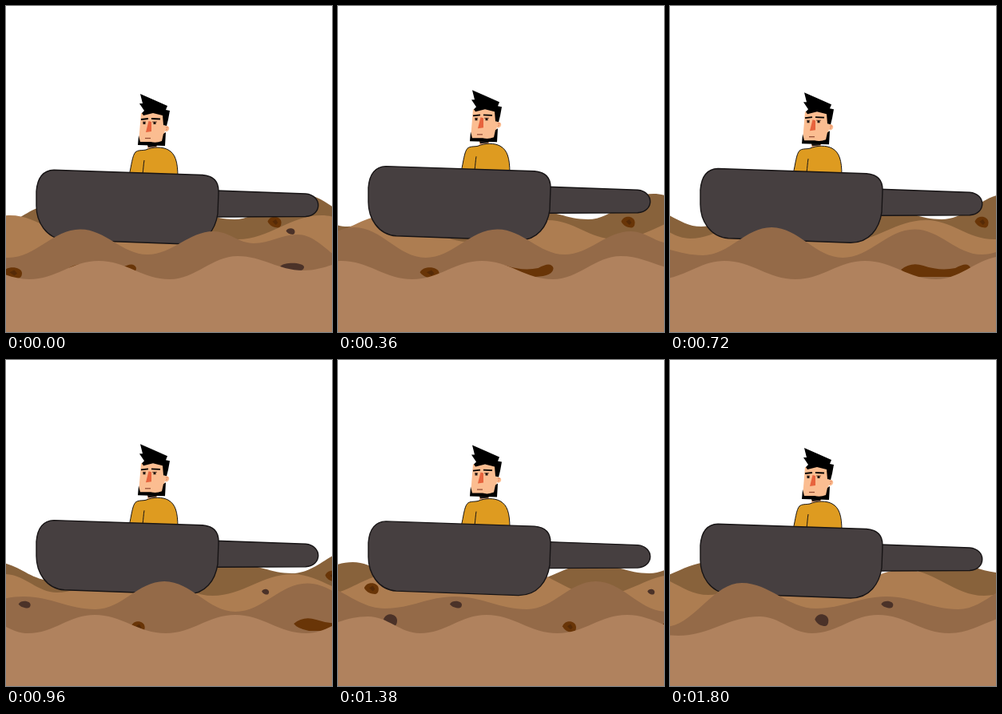
Write an HTML page with a canvas that moves like this. It is 408 px wide and 408 px high and loops after 1860 ms.

```html
<!DOCTYPE html>
<html lang="en">
<head>
<meta charset="utf-8">
<title>Pan on the dunes</title>
<style>
html, body { margin: 0; width: 100%; height: 100%; overflow: hidden; background: #fff; }
canvas { display: block; width: 408px; height: 408px; }
</style>
</head>
<body>
<canvas id="stage" width="408" height="408"></canvas>
<script>
const ctx = document.getElementById('stage').getContext('2d');
const LOOP = 1860, STEP = 60;
const BROWN = '#693507', DARK = '#4b3228', INK = '#171415';

// Each dune: speed in px/ms, crests and troughs, stones as [x, y, width, height, colour]
const dunes = [
  {
    speed: .075, color: '#88623b',
    ridge: [[-165, 275], [-85, 253], [-15, 276], [55, 250], [125, 279], [215, 255], [286, 267], [368, 235], [460, 275]],
    stones: [[336, 270.5, 17, 14, BROWN]]
  },
  {
    speed: .16, color: '#ad7d51',
    ridge: [[-320, 268], [-240, 294], [-155, 268], [-90, 291], [5, 262], [105, 295], [205, 268], [290, 292], [395, 262], [480, 290]],
    stones: [[356, 282, 11, 8, DARK], [171, 290, 9, 7, DARK], [-179, 286, 18, 14, BROWN]]
  },
  {
    speed: .296, color: '#946a48',
    ridge: [[-540, 334], [-443, 279], [-350, 311], [-262, 296], [-172, 312], [-86, 277], [3, 315], [93, 279.5], [177, 311], [260, 282], [310, 297], [365, 286], [440, 324]],
    stones: [[8, 334, 24, 14, BROWN], [-119, 334, 17, 14, BROWN], [358, 326.5, 30, 10, DARK],
      [-343, 325.5, 17, 15, DARK], [-261, 306, 15, 9, DARK]]
  },
  {
    speed: .178, color: '#b0825e',
    ridge: [[-400, 330], [-310, 345], [-208, 321], [-143, 342], [-60, 319], [29, 342], [116, 319], [205, 342], [290, 313], [372, 331], [450, 315]],
    stones: []
  }
];

function shape(d, fill, stroke, width = 1) {
  const path = new Path2D(d);
  if (fill) { ctx.fillStyle = fill; ctx.fill(path); }
  if (stroke) { ctx.strokeStyle = stroke; ctx.lineWidth = width; ctx.stroke(path); }
}

function drawStone([x, y, w, h, color]) {
  ctx.save();
  ctx.translate(x, y);
  ctx.scale(w / 2, h / 2);
  shape('M-1,-.1 C-.8,-.8 -.3,-1 .2,-.95 C.7,-.8 .95,-.5 1,0 C1,.5 .9,.95 .5,1 C0,1 -.7,.7 -1,-.1', color);
  if (color === BROWN) shape('M-.3,-.1 L.2,-.5 L.5,.1 L.2,.5 Z', '#552a07');
  ctx.restore();
}

function drawDune({ speed, color, ridge, stones }, t) {
  ctx.save();
  ctx.translate(speed * t, 0);
  ctx.beginPath();
  ctx.moveTo(ridge[0][0], 420);
  ctx.lineTo(...ridge[0]);
  for (let i = 1; i < ridge.length; i++) {
    const [x0, y0] = ridge[i - 1], [x1, y1] = ridge[i], ease = (x1 - x0) * .38;
    ctx.bezierCurveTo(x0 + ease, y0, x1 - ease, y1, x1, y1);
  }
  ctx.lineTo(ridge[ridge.length - 1][0], 420);
  ctx.fillStyle = color;
  ctx.fill();
  stones.forEach(drawStone);
  ctx.restore();
}

function drawMan() {
  const skin = '#fbbd91';
  shape('M177,170 H189 V181 H177 Z', skin);
  shape('M177,174 L189,174 L188,176 L178,177 Z', INK);
  shape('M154,212 C157,200 158,187 162,183 C165,180 170,181 175,180 C184,176 196,176 203,180 C212,185 215,195 215,214 Z', '#de9b20', INK);
  shape('M173,193 C172,199 172,203 171,210', null, INK);
  shape('M198,150 C203,148 206,153 203,156 C201,158 199,157 198,156 Z', skin);
  shape('M200,152 L203,152 M200,155 L202,154', null, '#dc7450', .8);
  shape('M169,134 L198,134 L199,171 L166,171 Z', skin);
  // beard and hair
  shape('M166,162 L165,174 L199,175 L200,158 L197,160 L195,169 Q188,172 181,170 L168,170 Z', '#000');
  shape('M168,110 L184,117 L202,125 L200,130 L205,131 L203,142 L201,150 L197,149 L196,137 L184,134 L172,137 L170,134 L173,131 L167,122 L171,122 Z', '#000');
  // face
  shape('M169,142 L178,141 M182,141 L193,141.5', null, '#000', 1.8);
  shape('M171,145 h4 M183,145 h6', null, '#5b3528', .8);
  shape('M171.5,145 h3 v3 h-3 Z M184.5,145 h3 v3 h-3 Z', '#211713');
  shape('M178.5,144 L182,145 L182,157 L175,158 Z', '#e7633d');
  shape('M174,165.5 L181,165.5', null, '#8f4731', 1.2);
}

function drawPan() {
  const iron = '#463f40';
  shape('M263,231 L375,235 C396,237 396,262 375,263.5 L262,264 Z', iron, INK, 1.4);
  shape('M60,205.3 L246,211.5 Q266,213 266,232 L265,260 C262,280 250,298 226,298 L73,292.5 C50,291 38,270 38,250 L38,232 Q40,206 60,205.3 Z', iron, INK, 1.4);
}

function drawLongStone(t) {
  ctx.save();
  ctx.translate(.296 * t, 0);
  shape('M76,330 Q88,320 104,325 Q125,332 144,328 Q160,319 163,328 Q163,338 140,339 L95,339 Q80,336 76,330 Z', BROWN);
  ctx.restore();
}

function draw(t) {
  ctx.fillStyle = '#fff';
  ctx.fillRect(0, 0, 408, 408);
  drawDune(dunes[0], t);
  drawDune(dunes[1], t);
  ctx.save();
  ctx.translate(0, -2.6 * (1 - Math.cos(t / 300 * Math.PI)));
  drawMan();
  drawPan();
  ctx.restore();
  drawDune(dunes[2], t);
  drawLongStone(t);
  drawDune(dunes[3], t);
}

const start = performance.now();
function tick() {
  const t = (performance.now() - start) % LOOP;
  draw(Math.floor(t / STEP) * STEP);
  requestAnimationFrame(tick);
}
tick();
</script>
</body>
</html>
```
